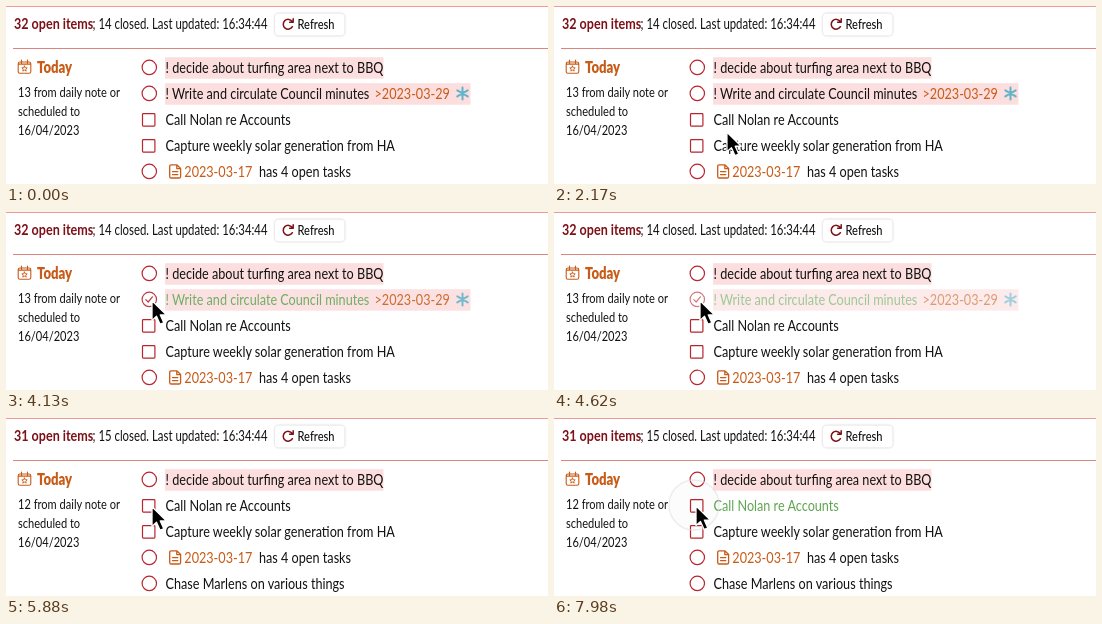
Write an HTML page that moves like this. It is 542 px wide and 178 px high and loops after 8000 ms.

```html
<!DOCTYPE html>
<html lang="en">
<head>
<meta charset="utf-8">
<title>Task dashboard</title>
<style>
  html, body { margin: 0; width: 100%; height: 100%; overflow: hidden; background: #fff; }
  svg { display: block; width: 542px; height: 178px; font-family: Lato, "Open Sans", sans-serif; }
  text { white-space: pre; }
  .button { filter: drop-shadow(0 .8px .8px rgba(0, 0, 0, .24)); }
  .icon { fill: none; stroke-linecap: round; stroke-linejoin: round; }
</style>
</head>
<body>
<svg id="stage" viewBox="0 0 542 178"></svg>
<script>
const LOOP = 8000, PITCH = 26, TOP = 61.4;
const CHECK = 3850, FADE = 3950, REMOVE = 5650, CHECK2 = 7860;
const INK = '#111', RED = '#b8252f', MAROON = '#7d0f17', ORANGE = '#c75b17', GREEN = '#5fa550', PINK = '#fcdedf';
const stage = document.getElementById('stage');

function add(parent, tag, attrs = {}) {
  const node = document.createElementNS('http://www.w3.org/2000/svg', tag);
  for (const key in attrs) node.setAttribute(key, attrs[key]);
  parent.appendChild(node);
  return node;
}

// All type is condensed by one factor per weight.
function label(parent, x, y, str, size = 16, fill = INK, weight = 400, squeeze = .791) {
  const node = add(parent, 'text', {
    transform: `translate(${x} ${y}) scale(${squeeze} 1)`,
    'font-size': size, 'font-weight': weight, fill
  });
  node.textContent = str;
  return node;
}

const icon = (parent, d, stroke, width = 1.4) =>
  add(parent, 'path', { class: 'icon', d, stroke, 'stroke-width': width });
const show = (node, on) => node.setAttribute('visibility', on ? 'visible' : 'hidden');
const setText = (node, str) => { if (node.textContent !== str) node.textContent = str; };
const clamp = v => Math.max(0, Math.min(1, v));

// Header
add(stage, 'rect', { width: 542, height: 178, fill: '#fff' });
add(stage, 'rect', { width: 542, height: 1, fill: '#ee9a9a' });
add(stage, 'rect', { x: 7, y: 42, width: 535, height: 1, fill: '#dc8480' });
const openCount = label(stage, 8, 23.3, '', 14.4, MAROON, 700, .873);
const closedCount = label(stage, 86.5, 23.3, '', 14.4);
add(stage, 'rect', { class: 'button', x: 269, y: 7.5, width: 69.5, height: 22, rx: 4, fill: '#fff' });
icon(stage, 'M286.2 15.5A4.9 4.9 0 1 0 286.4 20.7M287.2 12.7V16.3H283.6', MAROON, 1.5);
label(stage, 291.5, 23.3, 'Refresh', 14, INK, 500);

// Side panel
icon(stage, 'M14 56H23Q24.8 56 24.8 57.8V65.5Q24.8 67.3 23 67.3H14Q12.2 67.3 12.2 65.5V57.8Q12.2 56 14 56Z' +
  'M15.5 54V57.5M21.5 54V57.5M12.2 58.1H24.8', ORANGE, 1.1);
icon(stage, 'M18.5 60L19.3 61.7L21.2 61.9L19.8 63.2L20.2 65.1L18.5 64.1L16.8 65.1L17.2 63.2L15.8 61.9L17.7 61.7Z', ORANGE, .9);
label(stage, 31, 66.5, 'Today', 17, ORANGE, 900, .77);
const dueCount = label(stage, 12, 90.6, '', 14);
label(stage, 12, 110, 'scheduled to', 14);
label(stage, 12, 129.2, '16/04/2023', 14);

// Task rows, each drawn around its own centre line
function makeRow({ str, x = 159.5, end, box, mark }) {
  const g = add(stage, 'g');
  if (mark) add(g, 'rect', { x: 159, y: -10.2, width: mark - 159, height: 21.5, fill: PINK });
  if (box) add(g, 'rect', { x: 136.5, y: -5.7, width: 12.4, height: 12.4, rx: .8, fill: 'none', stroke: RED, 'stroke-width': 1.2 });
  else add(g, 'circle', { cx: 143.3, cy: 0, r: 7.2, fill: 'none', stroke: RED, 'stroke-width': 1.2 });
  const text = label(g, x, 5.5, str);
  const line = add(g, 'rect', { x: 159.5, y: 7.6, width: end - 159.5, height: 1, fill: '#cf7450' });
  return { g, text, line, end };
}

const decide = makeRow({ str: '! decide about turfing area next to BBQ', end: 376.5, mark: 377.5 });
const minutes = makeRow({ str: '! Write and circulate Council minutes', end: 367, mark: 464.5 });
label(minutes.g, 368.5, 5.5, '>2023-03-29', 16, ORANGE);
icon(minutes.g, 'M456.5 -6V6M451.3 -3L461.7 3M451.3 3L461.7 -3', '#62b2c8', 2);
const tick = icon(minutes.g, 'M139.8 .2L142.2 2.6L146.4 -2.6', RED, 1.2);
const call = makeRow({ str: 'Call Nolan re Accounts', end: 282, box: true });
const capture = makeRow({ str: 'Capture weekly solar generation from HA', end: 388, box: true });
const note = makeRow({ str: 'has 4 open tasks', x: 253, end: 344 });
icon(note.g, 'M165.2 -6.5H171L174.6 -2.9V5Q174.6 6.6 173 6.6H165.2Q163.7 6.6 163.7 5V-5Q163.7 -6.5 165.2 -6.5ZM166.5 .2H171.8M166.5 3.2H171.8M170.8 -6.3V-2.8H174.4', ORANGE, 1.3);
label(note.g, 178.3, 5.5, '2023-03-17', 16, ORANGE);
note.line.setAttribute('x', 163);
note.line.setAttribute('width', 82);
const chase = makeRow({ str: 'Chase Marlens on various things', end: 339 });
const rows = [decide, minutes, call, capture, note, chase];

// Pointer
const halo = add(stage, 'circle', { fill: '#000', 'fill-opacity': .025, stroke: '#dedede', 'stroke-width': 1.3 });
const pointer = add(stage, 'g');
const arrow = add(pointer, 'path', {
  d: 'M0 0V19.6L4.5 15.5L8.1 23.5L11.8 21.9L8.3 14.1H14.3Z',
  fill: '#000', stroke: '#fff', 'stroke-width': 1.3, 'stroke-linejoin': 'round'
});
const hand = add(pointer, 'path', {
  transform: 'scale(1.1)',
  d: 'M-2 2Q-2 0 0 0T2 2V9Q2 7.4 4 7.6T6 10Q6.2 8.4 8 8.7T9.7 11Q10 9.8 11.6 10.2T13 12.5V17.5Q13 20 11.3 22V25.5H.8V23Q-2 20 -4 16.4L-6.3 13Q-7 11.4 -5.6 10.8T-2 13.4ZM2 9V13.5M6 10V14M9.7 11V14.5M2.3 17V21.5M5.5 17V21.5M8.7 17V21.5',
  fill: '#fff', stroke: '#000', 'stroke-width': 1.2, 'stroke-linejoin': 'round', 'stroke-linecap': 'round'
});

const path = [
  [900, 206, 196], [1470, 184, 141.5], [1850, 184, 141.5], [2750, 146, 88.8],
  [6500, 146, 88.8], [7300, 142, 88], [LOOP, 142, 88]
];
function pointerAt(t) {
  if (t <= path[0][0]) return path[0].slice(1);
  const i = path.findIndex(p => p[0] >= t);
  const [t0, x0, y0] = path[i - 1], [t1, x1, y1] = path[i];
  const k = clamp((t - t0) / (t1 - t0)), e = k * k * (3 - 2 * k);
  return [x0 + (x1 - x0) * e, y0 + (y1 - y0) * e];
}

function drawHalo(t, x, y) {
  const start = [CHECK, CHECK2].map(c => c - 80).find(s => t >= s && t < s + 250);
  show(halo, start !== undefined);
  if (start === undefined) return;
  const k = (t - start) / 250;
  halo.setAttribute('cx', x - 2);
  halo.setAttribute('cy', y - 1);
  halo.setAttribute('r', 10 + 15 * clamp(k * 1.5));
  halo.setAttribute('opacity', clamp((1 - k) * 3));
}

function draw(t) {
  const removed = t >= REMOVE;
  setText(openCount, `${removed ? 31 : 32} open items`);
  setText(closedCount, `; ${removed ? 15 : 14} closed. Last updated: 16:34:44`);
  setText(dueCount, `${removed ? 12 : 13} from daily note or`);

  const [x, y] = pointerAt(t);
  let slot = 0, overLink = false;
  for (const row of rows) {
    const visible = !(removed && row === minutes);
    row.g.style.display = visible ? '' : 'none';
    if (!visible) continue;
    const cy = TOP + PITCH * slot++;
    row.g.setAttribute('transform', `translate(0 ${cy})`);
    const hover = x > 159 && x < row.end && Math.abs(y - cy) < 11;
    show(row.line, hover);
    overLink = overLink || hover;
  }
  minutes.text.setAttribute('fill', t >= CHECK ? GREEN : INK);
  minutes.g.setAttribute('opacity', 1 - clamp((t - FADE) / (REMOVE - FADE)));
  show(tick, t >= CHECK);
  call.text.setAttribute('fill', t >= CHECK2 ? GREEN : INK);

  pointer.setAttribute('transform', `translate(${x} ${y})`);
  show(hand, overLink);
  show(arrow, !overLink);
  drawHalo(t, x, y);
}

function tickFrame() {
  draw(performance.now() % LOOP);
  requestAnimationFrame(tickFrame);
}
tickFrame();
</script>
</body>
</html>
```
